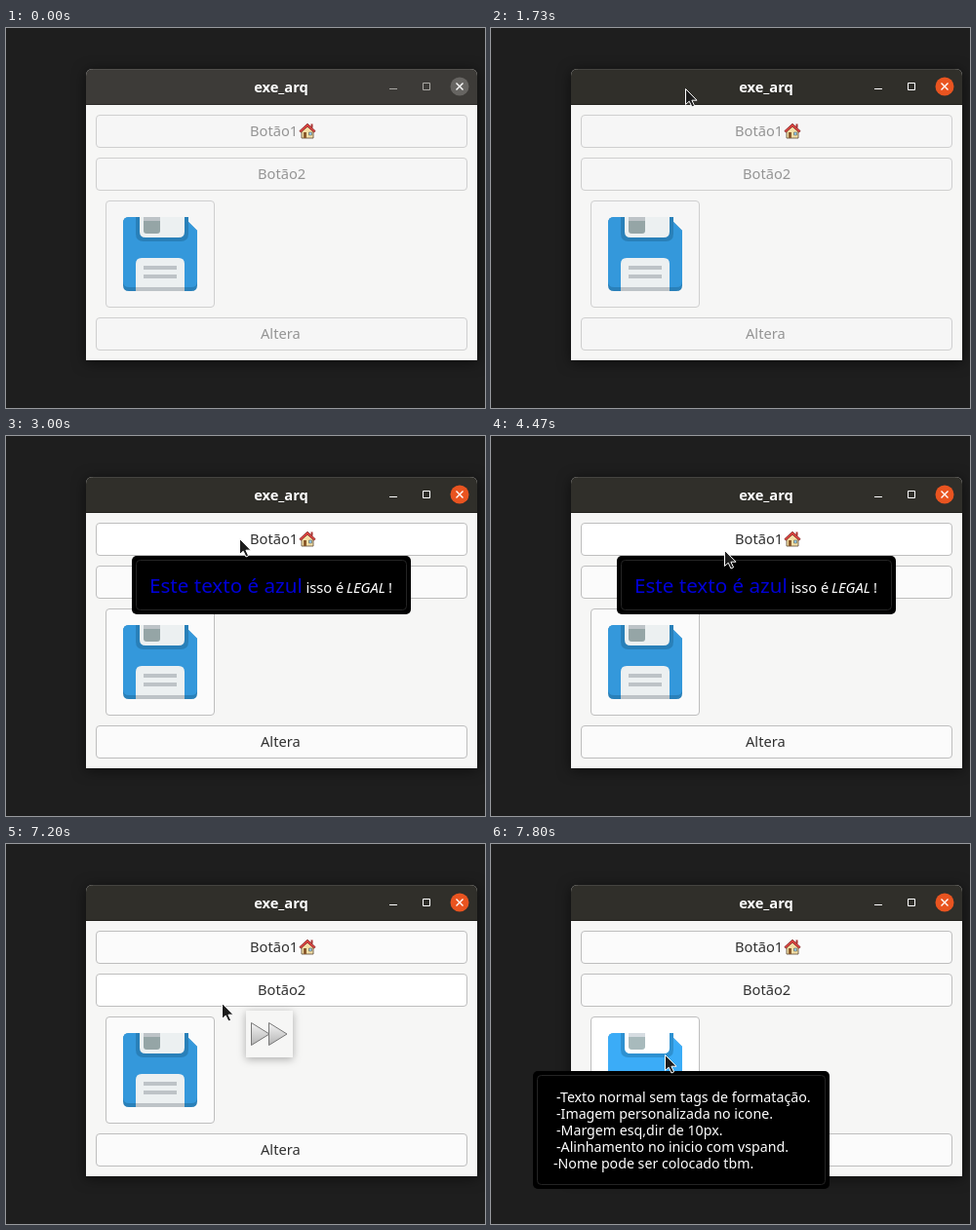
Write an HTML page that moves like this. It is 491 px wide and 390 px high and loops after 8000 ms.

```html
<!DOCTYPE html>
<html lang="pt">
<head>
<meta charset="utf-8">
<style>
html, body { margin: 0; width: 100%; height: 100%; overflow: hidden; background: #1e1e1e; }
svg { display: block; }
text { font: 14.67px "Noto Sans", "Open Sans", sans-serif; white-space: pre; }
#win { filter: drop-shadow(0 2px 7px rgba(0, 0, 0, .55)); }
#tip2 { filter: drop-shadow(0 2px 4px rgba(0, 0, 0, .3)); }
.title { font-weight: bold; fill: #fff; }
.tip text { fill: #fff; }
.tip .big { font-size: 20.6px; fill: #0000d8; }
.tip .em { font-style: italic; }
#tip3 text { font-size: 14.2px; }
</style>
</head>
<body>
<svg width="491" height="390" viewBox="0 0 491 390">
  <defs>
    <linearGradient id="steel" x2="0" y2="1">
      <stop stop-color="#f4f4f4"/><stop offset="1" stop-color="#b4b4b4"/>
    </linearGradient>
  </defs>

  <g id="win">
    <path d="M82 341V49q0-7 7-7H476q7 0 7 7V341z" fill="#f6f6f5"/>
    <path id="bar" d="M82 79V49q0-7 7-7H476q7 0 7 7V79z"/>
  </g>
  <path d="M88 42.5H477" stroke="#fff" stroke-opacity=".1"/>
  <path d="M82 78.5H483" stroke="#000" stroke-opacity=".3"/>
  <text class="title" x="282" y="66" text-anchor="middle">exe_arq</text>
  <path id="ctl" d="M393 62.5h8M427.5 56.5h7v7h-7z" fill="none"/>
  <circle id="close" cx="465" cy="60" r="9.5"/>
  <path d="M461.5 56.5l7 7m0-7l-7 7" stroke="#fff" stroke-width="1.4"/>

  <g id="buttons"></g>

  <g transform="translate(300 97)">
    <path d="M3 8L9 2.500L15 8V16H3z" fill="#f3dfa6" stroke="#5a4630" stroke-width=".8"/>
    <path d="M12.500 1.500h2v4h-2z" fill="#a33"/>
    <path d="M.8 8.700L9 1.200L17.200 8.700L15.600 10L9 4.200L2.400 10z" fill="#e0433f" stroke="#7d2525" stroke-width=".8"/>
    <path d="M5 10h3v6H5z" fill="#8a5a2c"/>
    <path d="M10.500 10h3v3h-3z" fill="#8fc6e8" stroke="#665" stroke-width=".6"/>
  </g>

  <g id="disk">
    <path d="M126 194H182L196 208V264q0 6-6 6H126q-6 0-6-6V200q0-6 6-6z" fill="#2980b9"/>
    <path d="M126 194H182L196 208V260q0 6-6 6H126q-6 0-6-6V200q0-6 6-6z" fill="#3498db"/>
    <path d="M133 194H187V211q0 8-8 8H141q-8 0-8-8z" fill="#2980b9"/>
    <path d="M137 194H183V209q0 6-6 6H143q-6 0-6-6z" fill="#ecf0f1"/>
    <path d="M141 194H158V208q0 3-3 3H144q-3 0-3-3z" fill="#95a5a6"/>
    <path d="M141 194H158V198H141z" fill="#bdc3c7"/>
    <path d="M133 270V242q0-6 6-6H177q6 0 6 6V270z" fill="#ecf0f1"/>
    <path d="M133 266H183V270H133zM141 244H175V248H141zM141 253H175V257H141z" fill="#bdc3c7"/>
  </g>

  <g id="tip1" class="tip">
    <rect x="129" y="123" width="286" height="60" rx="5"/>
    <rect x="133.500" y="127.500" width="277" height="51" rx="4" fill="none" stroke="#242424"/>
    <text class="big" x="147" y="161">Este texto é azul</text>
    <text x="307.500" y="161">isso é</text>
    <text class="em" x="349" y="161">LEGAL</text>
    <text x="392" y="161">!</text>
  </g>

  <g id="tip2">
    <rect x="246" y="171" width="48" height="48" fill="#f6f6f5"/>
    <path d="M251.500 183.500V206.500L270 195zM269.500 183.500V206.500L288 195z" fill="url(#steel)" stroke="#777"/>
  </g>

  <g id="tip3" class="tip">
    <rect x="43" y="233" width="304" height="121" rx="5"/>
    <rect x="47.500" y="237.500" width="295" height="112" rx="4" fill="none" stroke="#242424"/>
    <text x="67" y="265">-Texto normal sem tags de formatação.</text>
    <text x="67" y="282">-Imagem personalizada no icone.</text>
    <text x="67" y="299">-Margem esq,dir de 10px.</text>
    <text x="67" y="316">-Alinhamento no inicio com vspand.</text>
    <text x="64" y="333">-Nome pode ser colocado tbm.</text>
  </g>

  <path id="cursor" d="M.5 .5V16.500L4.200 13.200L7 19L9.600 17.800L6.900 12.200H12z" fill="#1c1c1c" stroke="#fff"/>
</svg>
<script>
const LOOP = 8000, FPS = 15;
const $ = id => document.getElementById(id);
const set = (el, attrs) => { for (const k in attrs) el.setAttribute(k, attrs[k]); };
const grey = v => `rgb(${v},${v},${v})`;
const ramp = (n, a, b) => Math.min(1, Math.max(0, (n - a) / (b - a)));

function add(tag, attrs, label = '') {
  const el = document.createElementNS('http://www.w3.org/2000/svg', tag);
  set(el, attrs);
  el.textContent = label;
  return $('buttons').appendChild(el);
}

// x, y, width, height, label, label x
const buttons = [
  [92.5, 89.5, 380, 33, 'Botão1', 250],
  [92.5, 133.5, 380, 33, 'Botão2', 258],
  [102.5, 177.5, 111, 109, '', 0],
  [92.5, 297.5, 380, 33, 'Altera', 261]
].map(([x, y, width, height, label, tx]) => ({
  box: add('rect', { x, y, width, height, rx: 3.5 }),
  text: add('text', { x: tx, y: y + 21.5 }, label)
}));

// Pointer stops: arrival tick, departure tick, x, y
const stops = [
  [14, 15, 139, -11], [17, 18, 179, 43], [20, 21, 191, 67], [23, 25, 197, 78],
  [26, 26, 199, 62], [35, 36, 239, 118], [37, 66, 239, 105], [67, 67, 239, 117],
  [72, 74, 237, 139], [75, 107, 237, 145], [108, 108, 221, 163], [113, 120, 178, 216]
];

function pointer(n) {
  const i = stops.findIndex(s => n <= s[1]);
  const [arrive, , x, y] = stops[i];
  if (n >= arrive || i === 0) return [x, y];
  const [, leave, px, py] = stops[i - 1];
  const p = ramp(n, leave, arrive);
  return [px + (x - px) * p, py + (y - py) * p];
}

function show(id, on) { $(id).style.display = on ? '' : 'none'; }

function draw(t) {
  const n = Math.floor((t + 4) * FPS / 1000);
  const active = n >= 26;
  const focus = ramp(n, 26, 30);
  const hover = [
    ramp(n, 30, 33) - ramp(n, 68, 71),
    ramp(n, 69, 72) - ramp(n, 108, 111),
    ramp(n, 110, 113),
    0
  ];

  set($('bar'), { fill: active ? '#302f2a' : '#3d3b38' });
  set($('ctl'), { stroke: active ? '#fff' : '#aaa8a4' });
  set($('close'), { fill: active ? '#e95420' : '#676562' });
  buttons.forEach(({ box, text }, i) => {
    set(box, { fill: grey(246 + 5 * focus + 4 * hover[i]), stroke: grey(207 - 17 * focus) });
    set(text, { fill: grey(148 - 100 * focus) });
  });
  $('disk').style.filter = `brightness(${1 + .13 * hover[2]})`;

  show('tip1', n >= 45 && n < 69);
  show('tip2', n >= 70 && n < 109);
  show('tip3', n >= 117);
  show('cursor', n >= 14);
  set($('cursor'), { transform: `translate(${pointer(n).map(Math.round)})` });
}

const start = performance.now();
function tick() {
  draw((performance.now() - start) % LOOP);
  requestAnimationFrame(tick);
}
tick();
</script>
</body>
</html>
```
